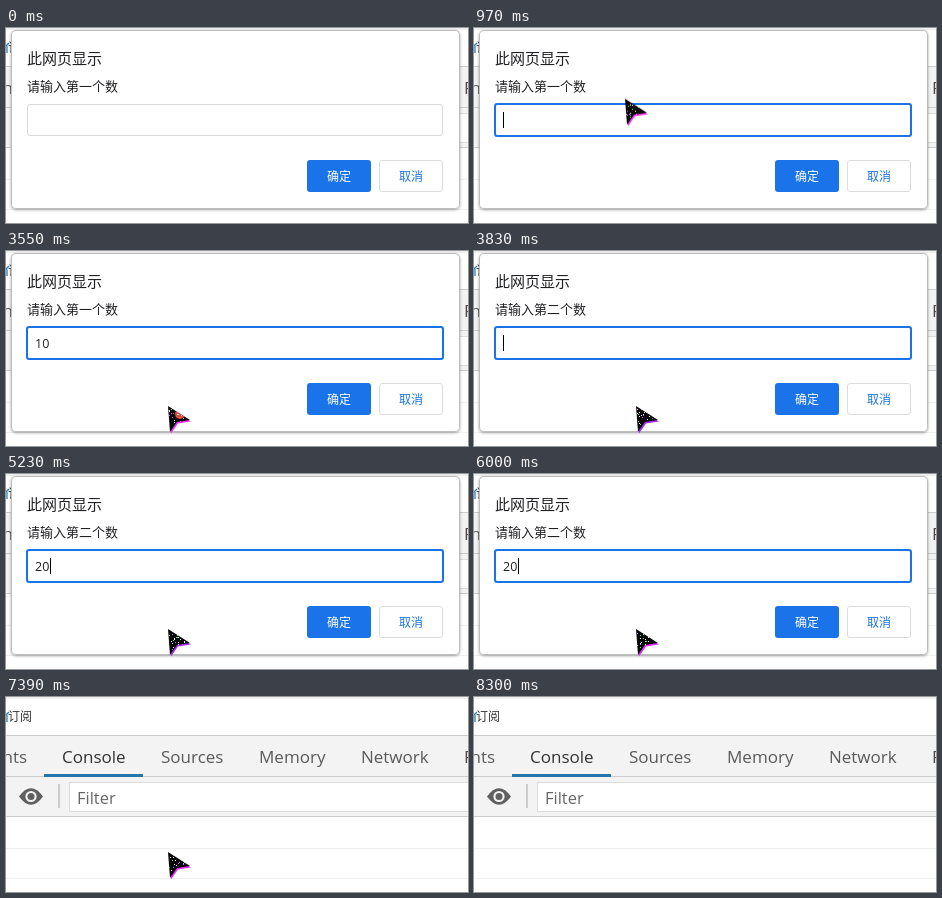
These frames come from a looping animation (462 px wide and 195 px high, 9.1 s). An HTML page with a canvas:

```html
<!DOCTYPE html>
<html lang="zh">
<head>
<meta charset="utf-8">
<title>Prompt sum</title>
<style>
  html, body { margin: 0; width: 100%; height: 100%; overflow: hidden; background: #fff; }
  #stage {
    position: relative; width: 462px; height: 195px; overflow: hidden; background: #fff;
    font: 13px/20px "Open Sans", "Noto Sans CJK SC", sans-serif; color: #202124;
  }
  #stage * { position: absolute; box-sizing: border-box; white-space: nowrap; }

  /* developer tools behind the dialogs */
  .top { left: 0; top: 0; width: 462px; height: 2px; background: #f0f0f0; }
  .sub { left: 2px; top: 10px; font-size: 12px; color: #333; }
  .bar { left: 0; top: 38px; width: 462px; height: 82px; background: #f3f3f3; border: solid #ccc; border-width: 1px 0; }
  .mid { left: 0; top: 79px; width: 462px; height: 1px; background: #ccc; }
  .tab { top: 50px; font-size: 17px; color: #5a5a5a; }
  .tab.on { color: #333; }
  .under { left: 38px; top: 77px; width: 99px; height: 3px; background: #2377ab; }
  .sep { left: 52px; top: 87px; width: 2px; height: 24px; background: #ccc; }
  .filter { left: 63px; top: 85px; width: 420px; height: 30px; background: #fff; border: 1px solid #ddd; }
  .filter span { left: 7px; top: 5px; font-size: 16.5px; color: #666; }
  .row { left: 0; width: 462px; height: 1px; background: #f0f0f0; }
  svg { left: 0; top: 0; }

  /* dialogs */
  .dialog {
    left: 5px; top: 2px; width: 449px; background: #fff; border-radius: 5px;
    box-shadow: inset 0 0 0 1px #bdbdbd, 0 1px 3px rgba(0,0,0,.35);
  }
  .title { left: 16px; top: 18px; font-size: 15px; }
  .label { left: 16px; top: 46px; }
  .field { left: 16px; top: 74px; width: 416px; height: 32px; border: 1px solid #dadada; border-radius: 3px; }
  .focus { left: 15px; top: 73px; width: 418px; height: 34px; border: 2px solid #1a73e8; border-radius: 3px; }
  .value { left: 24px; top: 81px; font-size: 12.5px; }
  .value span { position: static !important; }
  .caret { left: 24px; top: 82px; width: 1px; height: 16px; background: #000; }
  .btn { width: 64px; height: 32px; border-radius: 3px; font-size: 12px; line-height: 34px; text-align: center; }
  .ok { left: 296px; top: 130px; background: #1a73e8; color: #fff; font-weight: 500; }
  .no { left: 368px; top: 130px; line-height: 32px; border: 1px solid #dadce0; color: #1a73e8; }
  .ring { left: 367px; top: 81px; width: 66px; height: 34px; border: 2px solid #1a73e8; border-radius: 4px; }
  .yes { left: 370px; top: 84px; width: 60px; height: 28px; line-height: 30px; border-radius: 2px; background: #1a73e8; color: #fff; font-weight: 500; }
  #prompt { height: 179px; }
  #alert { height: 130px; }
  #cursor { left: 0; top: 0; }

  /* timeline */
  .t { animation: 9100ms step-end infinite; }
  #prompt { animation-name: prompt; }
  #alert { animation-name: alert; }
  .first { animation-name: first; }
  .second { animation-name: second; }
  .focus { animation-name: focus; }
  .d1 { animation-name: d1; }
  .d2 { animation-name: d2; }
  .d3 { animation-name: d3; }
  .d4 { animation-name: d4; }
  .caret { animation-name: blink, advance; }
  #cursor { animation: travel 9100ms linear infinite, appear 9100ms step-end infinite; }

  @keyframes prompt { 0%, 41.32% { opacity: 1 } 39.78%, 66.7%, 100% { opacity: 0 } }
  @keyframes alert { 0%, 81.21%, 100% { opacity: 0 } 68.24% { opacity: 1 } }
  @keyframes first { 0% { opacity: 1 } 39.78%, 100% { opacity: 0 } }
  @keyframes second { 0% { opacity: 0 } 39.78%, 100% { opacity: 1 } }
  @keyframes focus { 0% { opacity: 0 } 10%, 100% { opacity: 1 } }
  @keyframes d1 { 0%, 39.78%, 100% { opacity: 0 } 26.15% { opacity: 1 } }
  @keyframes d2 { 0%, 39.78%, 100% { opacity: 0 } 29.23% { opacity: 1 } }
  @keyframes d3 { 0% { opacity: 0 } 51.32%, 100% { opacity: 1 } }
  @keyframes d4 { 0% { opacity: 0 } 54.4%, 100% { opacity: 1 } }
  @keyframes blink {
    0%, 15.49%, 34.73%, 46.81%, 59.89%, 100% { opacity: 0 }
    10%, 20.99%, 41.32%, 51.32%, 65.38% { opacity: 1 }
  }
  @keyframes advance {
    0%, 39.78%, 100% { transform: none }
    26.15%, 51.32% { transform: translateX(8px) }
    29.23%, 54.4% { transform: translateX(15px) }
  }
  @keyframes travel {
    0%, .7% { transform: translate(184px, 192px) }
    4% { transform: translate(158px, 128px) }
    7.5%, 10% { transform: translate(127px, 64px) }
    11.4% { transform: translate(175px, 76px); animation-timing-function: ease-out }
    16%, 100% { transform: translate(161px, 154px) }
  }
  @keyframes appear { 0%, 91.2%, 100% { opacity: 0 } .76% { opacity: 1 } }
</style>
</head>
<body>
<div id="stage">
  <div class="top"></div>
  <div class="sub">订阅</div>
  <div class="bar"></div>
  <div class="mid"></div>
  <div class="tab" style="right:441px">nts</div>
  <div class="tab on" style="left:56px">Console</div>
  <div class="tab" style="left:155px">Sources</div>
  <div class="tab" style="left:253px">Memory</div>
  <div class="tab" style="left:355px">Network</div>
  <div class="tab" style="left:458px;color:#544">P</div>
  <div class="under"></div>
  <div class="sep"></div>
  <div class="filter"><span>Filter</span></div>
  <div class="row" style="top:151px"></div>
  <div class="row" style="top:181px"></div>
  <svg width="50" height="120">
    <path d="M0 18L3 15M1 18V25" stroke="#2a7fc0" stroke-width="1.3"/>
    <path d="M13 99.5Q25 83 37 99.5Q25 116 13 99.5Z" fill="#606060"/>
    <circle cx="25" cy="99.5" r="5.6" fill="#f3f3f3"/>
    <circle cx="25" cy="99.5" r="3.5" fill="#606060"/>
  </svg>

  <div id="prompt" class="dialog t">
    <div class="title">此网页显示</div>
    <div class="label first t">请输入第一个数</div>
    <div class="label second t">请输入第二个数</div>
    <div class="field"></div>
    <div class="focus t"></div>
    <div class="value"><span class="d1 t">1</span><span class="d2 t">0</span></div>
    <div class="value"><span class="d3 t">2</span><span class="d4 t">0</span></div>
    <div class="caret t"></div>
    <div class="btn ok">确定</div>
    <div class="btn no">取消</div>
  </div>

  <div id="alert" class="dialog t">
    <div class="title">此网页显示</div>
    <div class="label">30</div>
    <div class="ring"></div>
    <div class="btn yes">确定</div>
  </div>

  <canvas id="cursor" width="30" height="32"></canvas>
</div>
<script>
  const LOOP = 9100, STEP = 70;
  const ctx = document.getElementById('cursor').getContext('2d');
  const arrow = new Path2D('M1 1L23 15L10 17L3 27Z');
  const sparkColors = ['#fff', '#fff', '#7d7', '#b6f'];

  function seeded(seed) {
    return () => {
      seed = (seed * 16807) % 2147483647;
      return seed / 2147483647;
    };
  }

  // black arrow with a glowing lower edge and glitter inside
  function drawCursor(tick) {
    const rnd = seeded(tick * 7919 + 101);
    for (let i = 0; i < 3; i++) rnd();
    ctx.clearRect(0, 0, 30, 32);
    ctx.save();
    ctx.translate(1, 1.5);
    ctx.fillStyle = `hsl(${275 + rnd() * 30}, 95%, 58%)`;
    ctx.fill(arrow);
    ctx.restore();
    ctx.fillStyle = '#080808';
    ctx.fill(arrow);
    ctx.save();
    ctx.clip(arrow);
    const phase = tick % 16;
    if (phase >= 1 && phase <= 3) {
      ctx.fillStyle = '#e0503c';
      ctx.beginPath();
      ctx.arc(13, 9, 5, 0, 7);
      ctx.fill();
    }
    for (let i = 0; i < 24; i++) {
      ctx.fillStyle = sparkColors[Math.floor(rnd() * 4)];
      ctx.fillRect(2 + Math.floor(rnd() * 16), 4 + Math.floor(rnd() * 18), 1, 1);
    }
    ctx.restore();
  }

  let last = -1;
  function frame() {
    const tick = Math.floor((performance.now() % LOOP) / STEP);
    if (tick !== last) drawCursor(last = tick);
    requestAnimationFrame(frame);
  }
  frame();
</script>
</body>
</html>
```
